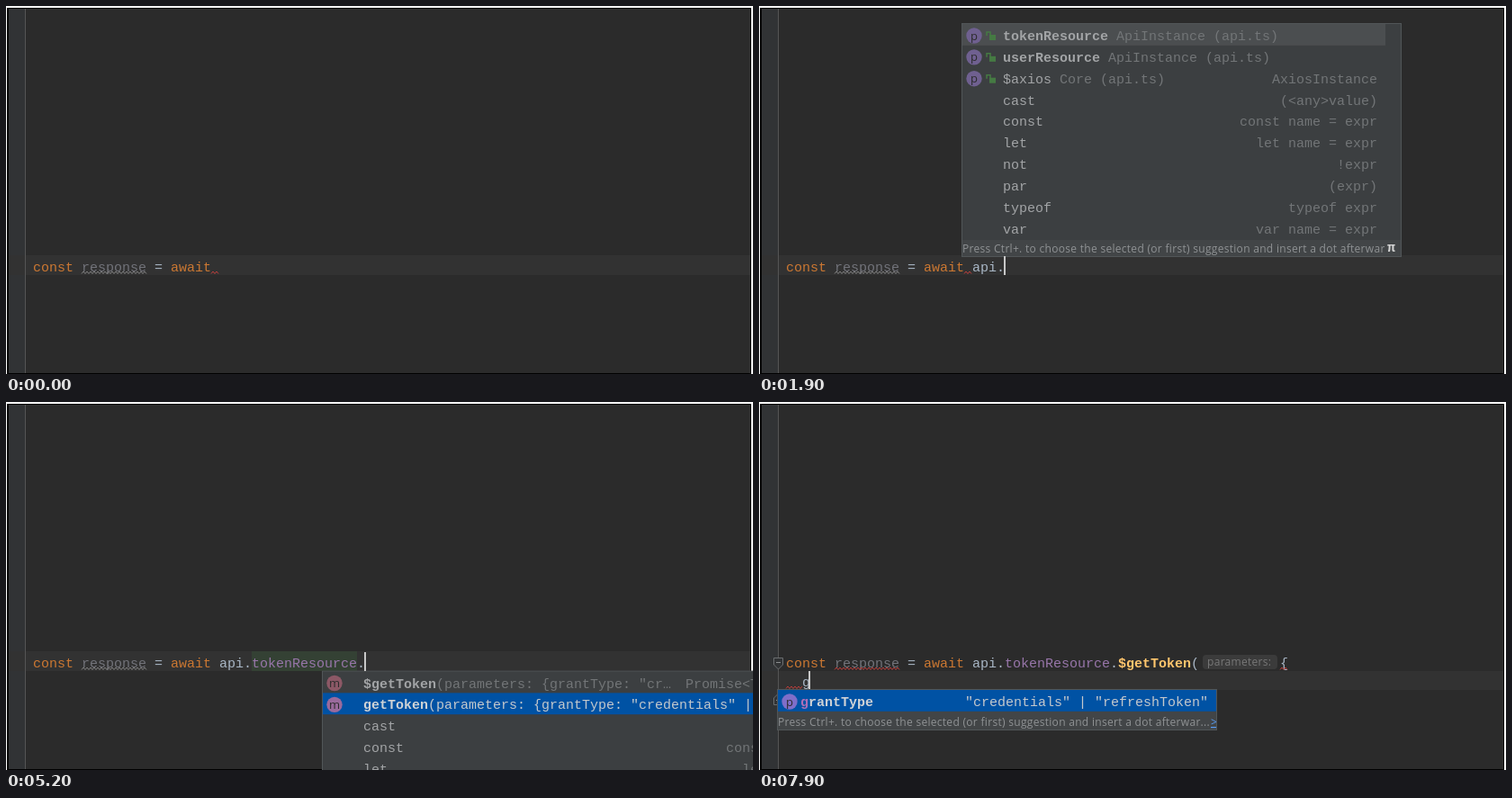
An HTML page for the animation above (8 s loop, 830 px wide and 409 px high).

```html
<!DOCTYPE html>
<html lang="en">
<head>
<meta charset="utf-8">
<title>Code completion</title>
<style>
html, body { margin: 0; width: 100%; height: 100%; overflow: hidden; background: #fff; }
svg { display: block; }
text { white-space: pre; font: 15px "Liberation Mono", monospace; }
text.ui { font: 12px "Open Sans", sans-serif; letter-spacing: .3px; }
text.bold { font-weight: bold; }
text.icon { font: 13px "Open Sans", sans-serif; text-anchor: middle; }
</style>
</head>
<body>
<svg id="stage" width="830" height="409"></svg>
<script>
const LOOP = 8000, CHAR = 9, LEFT = 30, ROW = 23.85, BASE = 295;
const PLAIN = '#a9b7c6', KEYWORD = '#cc7832', DIM = '#727577', NAME = '#a2a4a6',
      MATCH = '#b070b8', BRACE = '#ffef28', BLUE = '#0052a4', RED = '#bc3f3c';
const stage = document.getElementById('stage');
const timed = [];

function add(parent, tag, attrs, content) {
  const node = document.createElementNS('http://www.w3.org/2000/svg', tag);
  for (const key in attrs) node.setAttribute(key, attrs[key]);
  if (content) node.textContent = content;
  parent.append(node);
  return node;
}
const rect = (parent, x, y, width, height, fill, more) =>
  add(parent, 'rect', { x, y, width, height, fill, ...more });
const write = (parent, x, y, content, fill, cls = '', more) =>
  add(parent, 'text', { x, y, fill, class: cls, ...more }, content);
const stroke = (parent, d, color, width = 1, fill = 'none') =>
  add(parent, 'path', { d, stroke: color, 'stroke-width': width, fill });

function during(node, from, to = LOOP) {
  timed.push({ node, from, to });
  return node;
}

// Editor

const col = n => LEFT + n * CHAR;
const code = (x, content, color, from = 0, to = LOOP, line = 0, cls = '') =>
  during(write(stage, x, BASE + line * 21, content, color, cls), from, to);

function wave(x, width, y, color, from, to) {
  let d = `M${x} ${y + 3.5}`;
  for (let i = 2; i <= width; i += 2) d += `L${x + i} ${y + (i % 4 ? 1 : 3.5)}`;
  during(stroke(stage, d, color), from, to);
}

rect(stage, 1, 2, 827, 407, '#000');
rect(stage, 3, 3, 824, 405, '#2b2b2b');
rect(stage, 3, 3, 18, 405, '#313335');
during(rect(stage, 3, 277, 824, 22, '#323232'), 0, 6800);
during(rect(stage, 3, 299, 824, 21, '#323232'), 6800);
rect(stage, 21, 3, 1, 405, '#555555');

during(rect(stage, col(27), 277, 117, 22, '#344134'), 4000, 6500);
during(rect(stage, col(50), 277, 18, 22, '#3b514d'), 5900, 6300);
during(rect(stage, col(51), 277, 18, 22, '#3b514d'), 6300, 6800);

code(col(0), 'const', KEYWORD);
code(col(6), 'response', '#72737a');
code(col(15), '=', PLAIN);
code(col(17), 'await', KEYWORD);
[['a', 1200], ['p', 1300], ['i', 1500], ['.', 1700]].forEach(([letter, from], i) =>
  code(col(23 + i), letter, PLAIN, from));
code(col(27), 'tokenResource', PLAIN, 3600, 4000);
code(col(27), 'tokenResource', '#9876aa', 4000);
code(col(40), '.', PLAIN, 3900);
code(col(41), '$getToken', PLAIN, 5900, 6500);
code(col(41), '$getToken', '#ffc66d', 6500, LOOP, 0, 'bold');
code(col(50), '()', BRACE, 5900, 6300);
code(col(50), '(', PLAIN, 6300);
code(col(51), '{}', BRACE, 6300, 6800);
code(col(53), ')', PLAIN, 6300, 6800);
code(col(51), '{', PLAIN, 6800, 6900);
code(579, '{', PLAIN, 6900);
code(col(2), 'g', PLAIN, 7300, LOOP, 1);
code(col(0), '})', PLAIN, 6800, LOOP, 2);

during(rect(stage, 493, 281, 83, 16, '#3b3b3b', { rx: 4 }), 6900);
during(write(stage, 498, 293, 'parameters:', '#787878', 'ui'), 6900);

wave(col(6), 72, 294, '#808080', 0, 6500);
wave(col(6), 72, 294, RED, 6500);
wave(col(22), 8, 294, RED, 0, 3900);
wave(579, 8, 294, RED, 6900);
wave(col(0), 18, 315, RED, 6900);

const fold = (d, sign) => {
  during(stroke(stage, d, '#6b6e70', 1, '#313335'), 6800);
  during(stroke(stage, sign, '#8a8d8f'), 6800);
};
fold('M16.5 284.5H26.5V292L21.5 297L16.5 292Z', 'M19 289.5H24');
fold('M16.5 336.5H26.5V329L21.5 324L16.5 329Z', 'M19 331.5H24');

// Completion popups

const ICONS = { v: '#8a6a3a', m: '#8c5866', λ: '#8c5866', p: '#6f6090', M: '#9a6a9c', P: '#7f6ec9' };

function drawIcon(box, kind, y) {
  if (kind === '>') {
    stroke(box, `M7.5 ${y - 7}V${y + 7}H21M20 ${y - 7}L12 ${y + 2}M12 ${y - 5}V${y + 2}H19`, '#9a9da0', 2);
    return;
  }
  add(box, 'circle', { cx: 14, cy: y, r: 8.7, fill: ICONS[kind] });
  write(box, 14, y + 4.5, kind.toLowerCase(), '#2b2b2b', 'icon');
  if (kind === 'v') add(box, 'circle', { cx: 7, cy: y - 7, r: 2.5, fill: '#8f9295' });
  if (kind === 'm' && y > 60) add(box, 'circle', { cx: 8, cy: y + 6, r: 2.5, fill: '#7d9aa5' });
}

function drawLock(box, y, color, open) {
  const x = open ? 28 : 30;
  rect(box, x + (open ? 3 : 0), y - 1, 7, 6, color);
  stroke(box, open ? `M${x} ${y}V${y - 4}H${x + 4}V${y}` : `M${x + 1.5} ${y}V${y - 4}H${x + 5.5}V${y}`, color, 1.5);
}

function drawRow(box, spec, row, top, lit) {
  const [icon, name, detail, right, style = {}] = row;
  const textX = spec.textX || 46, base = top + 18;
  if (icon) drawIcon(box, icon, top + 13);
  if (style.lock) drawLock(box, top + 13, style.lock, style.open);
  const cls = style.bold ? 'bold' : '';
  const label = write(box, textX, base, '', lit ? '#d0d3d6' : NAME, cls);
  const at = spec.match ? name.indexOf(spec.match) : -1;
  const size = at < 0 ? 0 : spec.match.length;
  [[name.slice(0, Math.max(at, 0))],
   [name.substr(at, size), MATCH],
   [name.slice(Math.max(at, 0) + size)]].forEach(([part, fill]) => {
    if (part) add(label, 'tspan', fill ? { fill } : {}, part);
  });
  const soft = lit ? '#c4c8cc' : DIM;
  write(box, textX + name.length * CHAR, base, detail, soft);
  write(box, spec.right, base, right, soft, '', { 'text-anchor': 'end' });
}

function popup(from, to, spec, selected = 0, color = '#4b4e50') {
  const { x, y, w, h, foot = 18, first = 1 } = spec;
  const box = during(add(stage, 'svg', { x, y, width: w, height: h }), from, to);
  rect(box, 0, 0, w, h, '#3c3f41');
  rect(box, 1, first + selected * ROW, spec.barW || w - 19, ROW, color);
  spec.rows.forEach((row, i) =>
    drawRow(box, spec, row, first + i * ROW, i === selected && color === BLUE));
  if (spec.thumb) rect(box, w - 13, 0, 10, 20, '#595c5e');
  if (spec.tip) {
    rect(box, 0, h - foot - 1, w, foot + 1, '#424547');
    const line = add(box, 'svg', { width: spec.tipW || w - 19, height: h });
    write(line, spec.tipX || 1, h - 5, spec.tip, '#8f9294', 'ui');
  }
  if (spec.link) write(box, spec.linkX, h - 5, spec.link, '#589df6', 'ui', { 'text-decoration': 'underline' });
  if (spec.pi) write(box, w - 16, h - 6, 'π', '#d5d5d5', 'bold');
  rect(box, 0.5, 0.5, w - 1, h - 1, 'none', { stroke: '#515658' });
}

const api = ['v', 'api', ' (testApi.ts)', ''];
const apply = ['m', 'apply', '(target: Function, thisArgument: any, argumentsList…', 'any'];
const createApi = ['>', 'createApi', '(axios?: AxiosInstance)', 'ApiInstance'];
const escapeFn = ['λ', 'escape', '(string: string) (typescript)', 'string'];

const globals = {
  x: 188, y: -2, w: 627, h: 281, first: -12.85, right: 601, match: 'a', barW: 609, thumb: true, pi: true,
  tip: 'Ctrl+Down and Ctrl+Up will move caret down and up in the editor', tipX: 8, link: '>>', linkX: 400,
  rows: [
    ['', 'await', '', '', { bold: true }],
    api,
    ['>', 'axios', '', ''],
    ['v', 'axiosInstance', ' (testApi.ts)', ''],
    ['', 'async', '', '', { bold: true }],
    apply,
    ['v', 'arguments', ' (testApi.ts)', 'IArguments', { lock: '#a34f33' }],
    createApi,
    ['λ', 'parseFloat', '(string: string) (typescript)', 'number'],
    escapeFn,
    ['λ', 'eval', '(x: string) (typescript)', 'any'],
    ['λ', 'isNaN', '(number: number) (typescript)', 'boolean']
  ]
};
function narrowed(match, rows) {
  const h = Math.round(rows.length * ROW) + 20;
  return { ...globals, match, rows, h, y: 279 - h, first: 1, thumb: false };
}
popup(1300, 1400, globals);
popup(1400, 1600, narrowed('ap', [api, apply, createApi, escapeFn]));
popup(1600, 1700, narrowed('api', [api, createApi]));

const tip = 'Press Ctrl+. to choose the selected (or first) suggestion and insert a dot afterwar';
const open = { lock: '#457a43', open: true };
const postfix = [
  ['', 'cast', '', '(<any>value)'],
  ['', 'const', '', 'const name = expr'],
  ['', 'let', '', 'let name = expr'],
  ['', 'not', '', '!expr'],
  ['', 'par', '', '(expr)'],
  ['', 'typeof', '', 'typeof expr'],
  ['', 'var', '', 'var name = expr']
];
const resources = {
  x: 225, y: 19, w: 489, h: 260, right: 462, tip: tip + 'ds', pi: true,
  rows: [
    ['p', 'tokenResource', ' ApiInstance (api.ts)', '', { ...open, bold: true }],
    ['p', 'userResource', ' ApiInstance (api.ts)', '', { ...open, bold: true }],
    ['p', '$axios', ' Core (api.ts)', 'AxiosInstance', open],
    ...postfix
  ]
};
popup(1900, 2800, resources);
popup(2800, 3200, resources, 1, BLUE);
popup(3200, 3600, resources, 0, BLUE);

const methods = {
  x: 351, y: 298.5, w: 630, h: 260, right: 602,
  rows: [
    ['m', '$getToken', '(parameters: {grantType: "cr…', 'Promise<TokenResponse>', { bold: true }],
    ['M', 'getToken', '(parameters: {grantType: "credentials" | "r…', '', { bold: true }],
    ...postfix
  ]
};
popup(4300, 5000, methods);
popup(5000, 5400, methods, 1, BLUE);
popup(5400, 5900, methods, 0, BLUE);

const fields = {
  x: 20, y: 319, w: 489, h: 46, foot: 20, textX: 26, right: 479, barW: 487, match: 'g',
  tip: tip + '...', tipW: 482, link: '>', linkX: 482,
  rows: [['P', 'grantType', '', '"credentials" | "refreshToken"', { bold: true }]]
};
popup(7500, 7900, fields);
popup(7900, LOOP, fields, 0, BLUE);

// Caret: column, line, from, to; it sits on whole pixels of a slightly wider advance
const caretX = column => Math.floor(28.2 + column * 9.03);
[
  [23, 0, 600, 1200], [24, 0, 1200, 1300], [25, 0, 1300, 1500], [26, 0, 1500, 1700],
  [27, 0, 1700, 2500], [27, 0, 2900, 3400], [40, 0, 3600, 3900],
  [41, 0, 3900, 4800], [41, 0, 5200, 5700], [51, 0, 5900, 6300], [52, 0, 6300, 6800],
  [2, 1, 6800, 7300], [3, 1, 7300, LOOP]
].forEach(([column, line, from, to]) =>
  during(rect(stage, caretX(column), 278 + line * 21, 2, 21 - line, '#c8c8c8'), from, to));

const start = performance.now();
function draw() {
  const t = Math.max(0, performance.now() - start) % LOOP;
  for (const { node, from, to } of timed)
    node.style.display = t >= from && t < to ? '' : 'none';
  requestAnimationFrame(draw);
}
draw();
</script>
</body>
</html>
```
